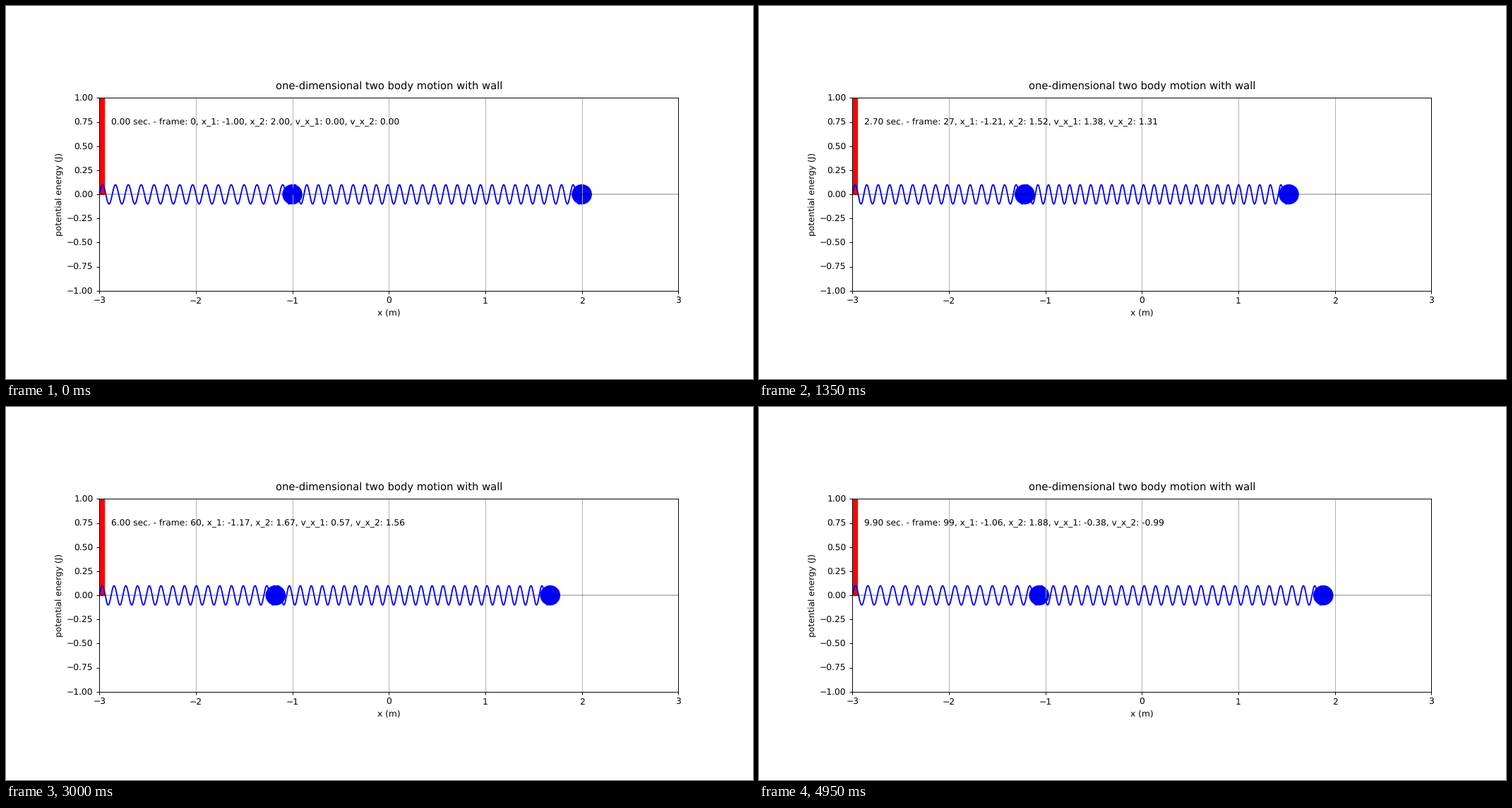
A matplotlib script that plays this animation: 1058x529 px, repeating every 5 s.

```python
import numpy as np
import matplotlib.pyplot as plt
from matplotlib.animation import FuncAnimation
from matplotlib.patches import Circle, Rectangle

plt.rcParams["font.family"] = "DejaVu Sans"
plt.rcParams["text.hinting"] = "none"

FRAMES, INTERVAL = 100, 50
DT = 0.1                        # simulated seconds per frame
WALL = -3.0
REST = np.array([-1.5, 1.0])    # equilibrium positions
START = np.array([-1.0, 2.0])   # released at rest
K_OVER_M = 10.0

# Normal modes of wall - spring - mass - spring - mass
eigenvalues, MODES = np.linalg.eigh(K_OVER_M * np.array([[2, -1], [-1, 1]]))
OMEGA = np.sqrt(eigenvalues)
AMPLITUDE = MODES.T @ (START - REST)


def state(t):
    """Positions and velocities of both bodies at time t."""
    x = REST + MODES @ (AMPLITUDE * np.cos(OMEGA * t))
    v = MODES @ (-AMPLITUDE * OMEGA * np.sin(OMEGA * t))
    return x, v + 0.0


def spring(left, right, coils):
    s = np.linspace(0, 1, 1000)
    return left + (right - left) * s, 0.1 * np.sin(2 * np.pi * coils * s)


fig, ax = plt.subplots(figsize=(12, 6), dpi=529 / 6)
ax.set_aspect("equal")
ax.set(xlim=(-3, 3), ylim=(-1, 1), xlabel="x (m)", ylabel="potential energy (J)")
ax.set_title("one-dimensional two body motion with wall", y=1.02)
ax.set_xticks(range(-3, 4))
ax.set_yticks(np.linspace(-1, 1, 9))
ax.grid(axis="x")
ax.axhline(0, color="black", linewidth=0.4)

ax.add_patch(Rectangle((WALL, 0), 0.05, 1, color="red"))
bodies = [ax.add_patch(Circle((x, 0), 0.1, color="blue")) for x in START]
springs = [ax.plot([], [], color="blue")[0] for _ in range(2)]
info = ax.text(-2.88, 0.73, "")


def update(frame):
    t = frame * DT
    (x1, x2), (v1, v2) = state(t)
    for body, x in zip(bodies, (x1, x2)):
        body.center = (x, 0)
    springs[0].set_data(*spring(WALL, x1, 15))
    springs[1].set_data(*spring(x1, x2, 25))
    info.set_text(f"{t:.2f} sec. - frame: {frame}, x_1: {x1:.2f}, x_2: {x2:.2f}, "
                  f"v_x_1: {v1:.2f}, v_x_2: {v2:.2f}")
    return [*bodies, *springs, info]


anim = FuncAnimation(fig, update, frames=FRAMES, interval=INTERVAL, repeat=True)
plt.show()
```
